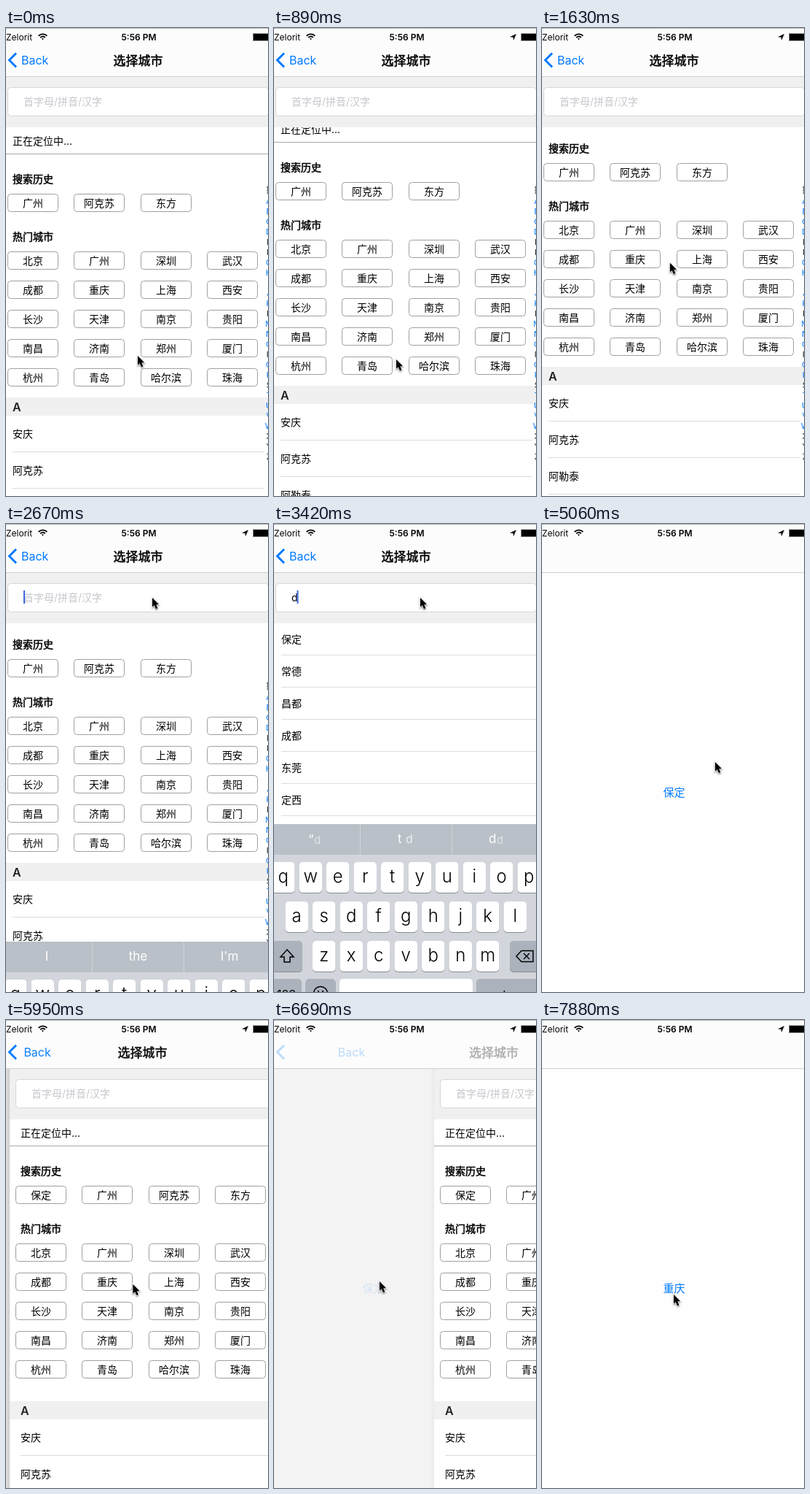
An HTML page with a canvas for the animation above (8 s loop, 360 by 641 pixels).

```html
<!DOCTYPE html>
<html lang="zh-CN">
<head>
<meta charset="utf-8">
<style>
html, body { margin: 0; width: 100%; height: 100%; overflow: hidden; background: #fff; }
canvas { display: block; width: 360px; height: 641px; }
</style>
</head>
<body>
<canvas></canvas>
<script>
const W = 360, H = 641, LOOP = 8000, STEP = 148.4;
const SCREEN = 375, LEFT = -6; // the phone screen is wider than the stage
const BLUE = '#007aff', INK = '#000';
const FONT = 'Inter, "Noto Sans CJK SC", "Noto Sans CJK", "Noto Sans", sans-serif';
const HOT = ['北京', '广州', '深圳', '武汉', '成都', '重庆', '上海', '西安', '长沙', '天津',
  '南京', '贵阳', '南昌', '济南', '郑州', '厦门', '杭州', '青岛', '哈尔滨', '珠海'];
const LIST = ['安庆', '阿克苏', '阿勒泰', '安康'];
const FOUND = ['保定', '常德', '昌都', '成都', '东莞', '定西', '丹东'];
const POINTER = [[0, 180, 448], [884, 167, 453], [1330, 164, 430], [1900, 185, 220], [2226, 200, 96],
  [2374, 200, 100], [3560, 200, 100], [4150, 120, 150], [4400, 120, 152], [5040, 237, 325],
  [5480, 184, 362], [5780, 182, 362], [6450, 144, 357], [6960, 144, 357], [7859, 180, 375]];
const SCROLL = [[440, 0], [884, 16], [1330, 42]];
const KEYBOARD = [[2560, 669], [2665, 572], [2813, 440], [2962, 412], [3110, 411]];

const canvas = document.querySelector('canvas');
const dpr = window.devicePixelRatio || 1;
canvas.width = W * dpr;
canvas.height = H * dpr;
const c = canvas.getContext('2d');

const clamp = v => Math.max(0, Math.min(1, v));
const span = (t, start, length) => clamp((t - start) / length);
const easeOut = u => 1 - (1 - u) ** 3;

// Linear track of [time, ...values]
function track(keys, t) {
  const i = keys.findIndex(k => k[0] > t);
  if (i === 0) return keys[0].slice(1);
  if (i < 0) return keys[keys.length - 1].slice(1);
  const a = keys[i - 1], b = keys[i], u = (t - a[0]) / (b[0] - a[0]);
  return a.slice(1).map((v, j) => v + (b[j + 1] - v) * u);
}

const baseline = (y, size) => Math.round(y + size * 0.37);

// y is the middle of the capitals
function text(s, x, y, size = 14, color = INK, align = 'left', weight = 400) {
  c.font = `${weight} ${size}px ${FONT}`;
  c.textAlign = align;
  c.fillStyle = color;
  c.fillText(s, x, baseline(y, size));
}

// Slightly thickened, between regular and bold
function heading(s, x, y, size, align) {
  text(s, x, y, size, INK, align);
  c.strokeStyle = INK;
  c.lineWidth = 0.5;
  c.strokeText(s, x, baseline(y, size));
}

function rect(x, y, w, h, color) {
  c.fillStyle = color;
  c.fillRect(x, y, w, h);
}

function round(x, y, w, h, r, fill, stroke) {
  c.beginPath();
  c.roundRect(x, y, w, h, r);
  if (fill) { c.fillStyle = fill; c.fill(); }
  if (stroke) { c.strokeStyle = stroke; c.lineWidth = 1; c.stroke(); }
}

function shape(points, fill, stroke, width = 1.5, close = true) {
  c.beginPath();
  points.forEach(p => c.lineTo(...p));
  if (close) c.closePath();
  if (stroke) { c.strokeStyle = stroke; c.lineWidth = width; c.stroke(); }
  if (fill) { c.fillStyle = fill; c.fill(); }
}

function faded(alpha, draw) {
  c.save();
  c.globalAlpha *= alpha;
  draw();
  c.restore();
}

function shifted(x, y, draw) {
  c.save();
  c.translate(x, y);
  draw();
  c.restore();
}

function tags(names, top) {
  names.forEach((name, i) => {
    const x = Math.round(2 + i % 4 * 91.4) + 0.5, y = top + Math.floor(i / 4) * 40;
    round(x, y + 0.5, 69, 24, 4, '#fff', '#a0a0a0');
    text(name, x + 34.5, y + 12.5, 14, INK, 'center');
  });
}

function cityList(history, gap) {
  text('正在定位中...', 9, 154.5);
  rect(LEFT, 172, SCREEN, 1, '#a8a8a8');
  heading('搜索历史', 9, 206.5, 14, 'left');
  tags(history, 227);
  heading('热门城市', 9, 285.5, 14, 'left');
  tags(HOT, 306);
  const top = 506 + gap;
  rect(LEFT, top, SCREEN, 25, '#f0f0f0');
  text('A', 9, top + 13, 16, '#222', 'left', 600);
  LIST.forEach((name, i) => {
    text(name, 9, top + 50 + i * 50);
    rect(9, top + 74 + i * 50, 346, 1, '#dcdcdc');
  });
}

function indexBar() {
  text('搜', 363, 222, 11, '#444', 'center');
  for (let i = 0; i < 26; i++) {
    const letter = String.fromCharCode(65 + i);
    text(letter, 361.2, 237 + i * 14, 11, 'EFLPSXYZ'.includes(letter) ? '#333' : BLUE, 'center');
  }
}

function results() {
  FOUND.forEach((name, i) => {
    text(name, 10, 158 + i * 44);
    rect(10, 179 + i * 44, SCREEN, 1, '#dedee0');
  });
}

function searchBox(typed, caret) {
  rect(LEFT, 67, SCREEN, 69, '#f0f0f0');
  round(2.5, 81.5, 358, 39, 4, '#fff', '#d6d6d6');
  if (typed) text('d', 24, 101);
  else text('首字母/拼音/汉字', 24, 101, 14, '#c7c7cd');
  if (caret) rect(typed ? 31.5 : 24, 91, 2, 18, '#3f68e0');
}

function key(x, y, w, dark) {
  round(x, y + 1, w, 42, 5, '#888b90');
  round(x, y, w, 42, 5, dark ? '#abb2bc' : '#fff');
}

// Drawn with its top edge at zero
function keyboard(typed) {
  rect(LEFT, 0, SCREEN, 260, '#d2d5db');
  rect(LEFT, 0, SCREEN, 42, '#bac0c7');
  rect(118, 0, 1, 42, '#d0d5da');
  rect(244, 0, 1, 42, '#d0d5da');
  const dim = '#dfe3e7';
  if (typed) {
    text('“', 47, 21, 17, '#fff');
    text('d', 55, 21, 15, dim);
    text('t', 170, 20, 17, '#fff');
    text('d', 181, 20, 16, '#eef0f2');
    text('d', 295, 20, 17, '#fff');
    text('d', 306, 21, 15, dim);
  } else {
    ['I', 'the', "I'm"].forEach((s, i) => text(s, 56 + i * 125.5, 20, 17, '#fff', 'center'));
  }
  [['qwertyuiop', -3], ['asdfghjkl', 15.5], ['zxcvbnm', 53]].forEach(([row, left], r) => {
    [...row].forEach((letter, i) => {
      const x = left + i * 37.5, y = 52 + r * 54;
      key(x, y, 31.5);
      text(letter, x + 15.7, y + 19, 24, INK, 'center', 300);
    });
  });
  key(-3, 160, 42, true);
  key(324, 160, 42, true);
  shape([[18, 172], [27, 182], [22, 182], [22, 189], [14, 189], [14, 182], [9, 182]], null, INK);
  shape([[333, 181], [340, 173.5], [356, 173.5], [356, 188.5], [340, 188.5]], null, INK);
  shape([[343, 177], [351, 185]], null, INK, 1.5, false);
  shape([[351, 177], [343, 185]], null, INK, 1.5, false);
  key(-3, 212, 41, true);
  key(43.5, 212, 41, true);
  key(90, 212, 183);
  key(278, 212, 90, true);
  text('123', 17, 233, 16, INK, 'center');
  text('space', 181, 233, 16, INK, 'center');
  text('return', 322, 233, 16, INK, 'center');
  c.beginPath();
  c.arc(64, 232, 9.5, 0, 7);
  c.lineWidth = 1.5;
  c.strokeStyle = INK;
  c.stroke();
  rect(60, 228, 2, 3, INK);
  rect(66, 228, 2, 3, INK);
}

function cityPage(t) {
  const second = t > 5000, typed = !second && t >= 3250, searching = !second && t >= 2600;
  rect(LEFT, 67, SCREEN, H, '#fff');
  if (typed) results();
  else if (second) cityList(['保定', '广州', '阿克苏', '东方'], 16);
  else shifted(0, -Math.round(track(SCROLL, t)[0]), () => cityList(['广州', '阿克苏', '东方'], 0));
  searchBox(typed, searching);
  if (!typed) indexBar();
  if (searching) shifted(0, Math.round(track(KEYBOARD, t)[0]), () => keyboard(typed));
}

function homePage(t) {
  const old = 1 - span(t, 6540, 150);
  faded(old, () => text('保定', 181.5, 367.5, 15, BLUE, 'center'));
  faded(span(t, 6690, 300), () => text('重庆', 181.5, 367.5, 15, BLUE, 'center'));
}

// Share of the city page that is on screen
function shown(t) {
  const leave = start => 1 - easeOut(span(t, start, 480));
  if (t < 5000) return leave(4300);
  return t < 6300 ? easeOut(span(t, 5600, 480)) : leave(6545);
}

function navBar(p) {
  rect(0, 0, W, 66, '#fcfcfc');
  rect(0, 66, W, 1, '#cfcfd1');
  faded(p ** 1.5, () => {
    shape([[14, 34.5], [4.5, 44], [14, 53.5]], null, BLUE, 3, false);
    text('Back', 21 + 111 * (1 - p), 44.5, 16, BLUE);
    heading('选择城市', 181.5 + 200 * (1 - p), 44.5, 17, 'center');
  });
}

function statusBar(t) {
  rect(0, 0, W, 1, '#b4b4b4');
  text('Zelorit', 0, 12.5, 12);
  text('5:56 PM', 182.5, 12.5, 12, INK, 'center', 600);
  c.strokeStyle = INK;
  c.lineWidth = 1.8;
  [1.2, 4.6, 8].forEach(r => {
    c.beginPath();
    c.arc(50.5, 16.3, r, -Math.PI * 0.76, -Math.PI * 0.24);
    c.stroke();
  });
  if (t > 440) shape([[333, 8], [324, 12.3], [328.5, 12.8], [329, 17]], INK);
  rect(339, 7, 21, 11, '#999');
  rect(340, 8, 20, 9, INK);
}

function pointer(x, y) {
  shifted(x, y, () => {
    c.shadowColor = 'rgba(0,0,0,.4)';
    c.shadowBlur = 2 * dpr;
    c.shadowOffsetY = dpr;
    shape([[1, 1], [1, 13.5], [3.8, 11], [6, 16.2], [8.4, 15.2], [6.2, 10.2], [10, 10]], INK, '#fff', 2);
  });
}

function draw(t) {
  c.setTransform(dpr, 0, 0, dpr, 0, 0);
  const p = shown(t), offset = Math.round(SCREEN * (1 - p));
  rect(0, 0, W, H, '#fefefe');
  if (p < 1) {
    shifted(-0.3 * SCREEN * p, 0, () => homePage(t));
    rect(0, 67, W, H, `rgba(0,0,0,${0.11 * p})`);
  }
  if (p > 0) {
    shifted(offset, 0, () => {
      const edge = c.createLinearGradient(LEFT - 6, 0, LEFT, 0);
      edge.addColorStop(0, 'rgba(0,0,0,0)');
      edge.addColorStop(1, `rgba(0,0,0,${0.1 * p})`);
      rect(LEFT - 6, 67, 6, H, edge);
      c.beginPath();
      c.rect(LEFT, 67, SCREEN, H);
      c.clip();
      cityPage(t);
    });
  }
  navBar(p);
  statusBar(t);
  pointer(...track(POINTER, t));
}

function tick(now) {
  const step = Math.floor((now % LOOP + 6) / STEP);
  draw(Math.max(0, step * STEP - 6));
  requestAnimationFrame(tick);
}
requestAnimationFrame(tick);
</script>
</body>
</html>
```
